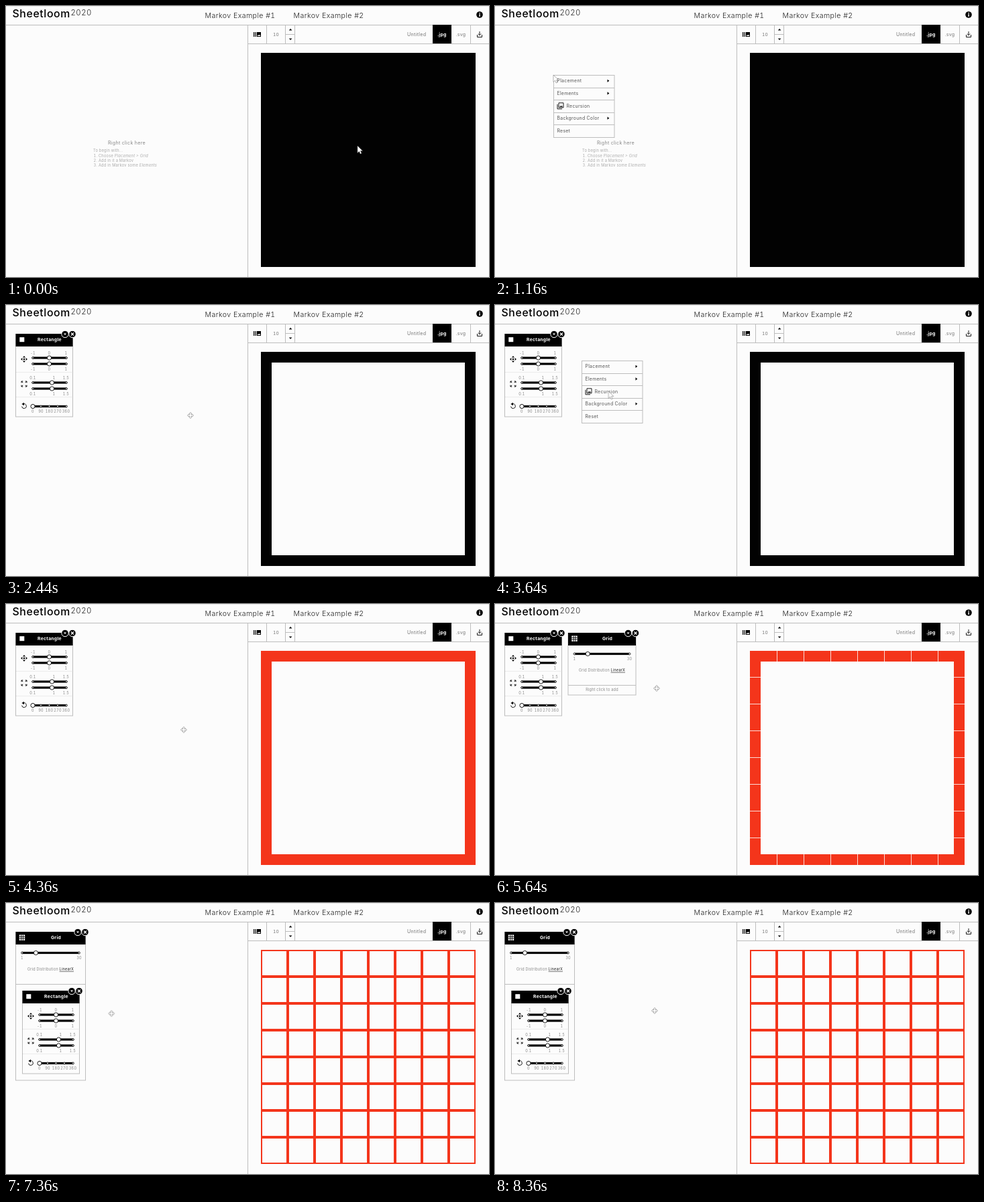
These frames come from a looping animation (720 px wide and 405 px high, 8440 ms). An HTML page:

```html
<!DOCTYPE html>
<html lang="en">
<head>
<meta charset="utf-8">
<title>Sheetloom</title>
<style>
  html, body { margin: 0; width: 100%; height: 100%; overflow: hidden; background: #fcfcfc; }
  svg { display: block; width: 100vw; height: 100vh; }
  text {
    font-family: Inter, Arial, sans-serif; font-variant-numeric: tabular-nums;
    letter-spacing: .04em; white-space: pre;
  }
  .line { fill: none; stroke: #bdbdbd; stroke-width: 1; }
  .faint { stroke: #dcdcdc; stroke-dasharray: 1 1; }
  .ink { fill: none; stroke: #000; stroke-width: .9; }
  .box { fill: #fcfcfc; stroke: #bdbdbd; }
  .mid { text-anchor: middle; }
  .light { font-weight: 300; }
  .medium { font-weight: 500; }
  .bold { font-weight: 700; fill: #fff; }
</style>
</head>
<body>
<svg id="stage" viewBox="0 0 720 405"></svg>
<script>
const LOOP = 8440;
const RED = '#f4351b';
const css = [];
const pct = ms => (ms / LOOP * 100).toFixed(3) + '%';

// --- drawing helpers ---
const text = (x, y, size, str, fill = '#555', cls = '') =>
  `<text x="${x}" y="${y}" font-size="${size}" fill="${fill}" class="${cls}">${str}</text>`;
const label = (x, y, str) => text(x, y, 5.5, str, '#888', 'mid');
const rect = (x, y, w, h, fill = '#000', extra = '') =>
  `<rect x="${x}" y="${y}" width="${w}" height="${h}" fill="${fill}" ${extra}/>`;
const box = (x, y, w, h) => `<rect class="box" x="${x}" y="${y}" width="${w}" height="${h}"/>`;
const path = (d, cls = 'line') => `<path class="${cls}" d="${d}"/>`;
const dot = (x, y, r, fill = '#fff') =>
  `<circle cx="${x}" cy="${y}" r="${r}" fill="${fill}" stroke="#000" stroke-width=".9"/>`;
const at = (x, y, body) => `<g transform="translate(${x} ${y})">${body}</g>`;

// Visible only during the given [from, to] spans, in ms.
let shown = 0;
function show(spans, body) {
  const name = 'show' + shown++;
  const keys = spans.map(([a, b]) =>
    `${pct(a)} { opacity: 1 } ` + (b < LOOP ? `${pct(b)} { opacity: 0 }` : '')).join(' ');
  css.push(`@keyframes ${name} { 0% { opacity: 0 } ${keys} }
    #${name} { opacity: 0; animation: ${name} ${LOOP}ms step-end infinite }`);
  return `<g id="${name}">${body}</g>`;
}

// --- icons ---
const moveIcon = '<path d="M0-5 2-2.6H-2ZM0 5 2 2.6H-2ZM-5 0-2.6-2V2ZM5 0 2.6-2V2Z"/>' +
  rect(-1.1, -1.1, 2.2, 2.2);
const growIcon = path('M-4-1.6V-4H-1.6M1.6-4H4V-1.6M4 1.6V4H1.6M-1.6 4H-4V1.6M-4-4-1.7-1.7M4-4 1.7-1.7M4 4 1.7 1.7M-4 4-1.7 1.7', 'ink');
const turnIcon = path('M-1-3A3.3 3.3 0 1 1-3.3 .6', 'ink') + '<path d="M-3.6-2.9 0-5.2V-.7Z"/>';
const gridIcon = rect(0, 0, 8.4, 8.4, '#fff') +
  path('M0 2.8H8.4M0 5.6H8.4M2.8 0V8.4M5.6 0V8.4', 'ink');
const recurIcon = path('M2.5.5H9.5V7.5H2.5ZM.5 2.5V9.5H7.5', 'ink') + '<path d="M3.8 6.4 5 4.8 6 5.7 7 4.4 8.4 6.4Z"/>';

function header(x, w, title) {
  const right = x + w;
  const button = (cx, mark) => `<circle cx="${cx}" cy="43.5" r="5.2" stroke="#fcfcfc"/>` + at(cx, 43.5, mark);
  return rect(x, 43, w, 19) +
    text(x + w / 2 + 8, 54.2, 6.8, title, '#fff', 'mid bold') +
    button(right - 11.5, '<path d="M-2-1H2L0 1.4Z" fill="#fff"/>') +
    button(right - .5, '<path d="M-2-2 2 2M2-2-2 2" stroke="#fff" stroke-width="1.2"/>');
}

function slider(x1, x2, y, knob, stops = []) {
  return rect(x1, y - 1.6, x2 - x1, 3.2) +
    [x1, x2, ...stops].map(x => dot(x, y, 1.4)).join('') + dot(knob, y, 3.1);
}

function rectBlock() {
  const row = (y, xs, names) => xs.map((x, i) => label(x, y, names[i])).join('');
  const shift = [40, 64.5, 89.5], scale = [40, 71.5, 89.5], turn = [40, 52, 64.5, 77, 89.5];
  const pair = (y, knob, xs, names) =>
    row(y - 5, xs, names) + slider(40, 90, y, knob) + slider(40, 90, y + 9, knob) + row(y + 19, xs, names);
  return box(14.5, 43.5, 85, 123.5) + header(14.5, 85, 'Rectangle') + rect(20.3, 48.2, 7, 7, '#fff') +
    at(27, 81, moveIcon) + pair(79, 64.5, shift, ['-1', '0', '1']) +
    path('M15 100.5H99M15 137.5H99', 'line faint') +
    at(27, 118, growIcon) + pair(116, 68.5, scale, ['0.1', '1', '1.5']) +
    at(27, 151, turnIcon) + slider(40, 90, 151.5, 40, [52, 64.5, 77]) +
    row(161, turn, [0, 90, 180, 270, 360]);
}

function gridBlock(x, w, h) {
  const a = x + 9.5, b = x + w - 9.5;
  return box(x, 43.5, w, h) + header(x, w, 'Grid') + at(x + 5.3, 47.5, gridIcon) +
    slider(a, b, 74.5, a + (b - a) * 7 / 29) + label(a, 84, 1) + label(b, 84, 30) +
    text(x + w / 2, 101.3, 5.5, 'Grid Distribution <tspan fill="#222" text-decoration="underline">LinearX</tspan>', '#888', 'mid') +
    path(`M${x} 121.5h${w}`);
}

// --- menus ---
const ROW = 18.6;
function list(x, y, w, names) {
  return box(x, y, w, ROW * names.length) + names.map((name, i) => {
    const top = y + i * ROW;
    const icon = name === 'Recursion';
    return (i ? path(`M${x} ${Math.floor(top) + .5}h${w}`) : '') +
      text(x + (icon ? 19 : 5), top + 10.8, 6.9, name) +
      (icon ? at(x + 5, top + 3.6, recurIcon) : '');
  }).join('');
}
function menu(x, y) {
  const arrow = i => at(x + 80, y + ROW * (i + .45), '<path d="M0-2.2V2.2L2.8 0Z"/>');
  return list(x, y, 90.5, ['Placement', 'Elements', 'Recursion', 'Background Color', 'Reset']) +
    [0, 1, 3].map(arrow).join('');
}
function swatches(x, y) {
  const colors = ['#000', '#fff', RED, '#f7a21b', '#f5e050', '#33a45a', '#2c62d6', '#8a3fb0'];
  return box(x, y, 51, 156) +
    colors.map((c, i) => rect(x + 3, y + 3 + i * 19, 45, 17, c, 'stroke="#a0a0a0" stroke-width=".5"')).join('');
}

// --- scene parts ---
const chrome =
  path('M0 .5H720', 'line faint') +
  path('M0 28.5H720M360.5 28V405M360 56.5H720M388.5 28V56M416.5 28V56M430.5 28V56M416 42.5H431M692.5 28V56') +
  text(9.5, 17.4, 15.8, 'Sheetloom', '#000', 'medium') +
  text(96.5, 14.3, 11.4, '2020', '#222', 'light') +
  text(296.5, 17.6, 10.6, 'Markov Example #1', '#222', 'light') +
  text(428.5, 17.6, 10.6, 'Markov Example #2', '#222', 'light') +
  '<circle cx="706" cy="13" r="4.8"/>' + rect(705.3, 12.2, 1.5, 3.6, '#fff') + rect(705.3, 10, 1.5, 1.4, '#fff') +
  rect(369, 39, 1.2, 7) + rect(371.4, 39, 1.2, 7) + rect(373.8, 39, 6.2, 7) +
  '<path d="M374.6 45 376 43 377 44 378 42.4 379.4 45Z" fill="#fff"/>' +
  text(402.5, 44.6, 6.6, '10', '#777', 'mid') +
  '<path d="M421.8 36.4h4.6l-2.3-2.6ZM421.8 48.4h4.6l-2.3 2.6Z"/>' +
  text(598, 44.6, 7.1, 'Untitled', '#777') + rect(636, 28, 28, 28) +
  text(650, 44.6, 6.9, '.jpg', '#fff', 'mid bold') + text(678, 44.6, 7, '.svg', '#777', 'mid') +
  path('M702.5 43V46.5H709.5V43M706 38V43.5M703.8 41.5 706 43.7 708.2 41.5', 'ink');

const hint =
  text(180, 206.6, 7.1, 'Right click here', '#888', 'mid') +
  text(130, 218.2, 5.7, 'To begin with...', '#aaa') +
  ['Choose <tspan font-style="italic">Placement &gt; Grid</tspan>', 'Add in it a Markov',
   'Add in Markov some <tspan font-style="italic">Elements</tspan>']
    .map((s, i) => text(130.5, 225.6 + i * 7.3, 5.7, `${i + 1}. ${s}`, '#aaa')).join('');

const sheet = fill => rect(380, 70, 320, 320, fill);
const steps = Array.from({ length: 8 }, (_, i) => i * 40);
const gridLines = `<path stroke="#fbdcd7" d="${
  steps.slice(1).map(d => `M${380 + d}.5 70V390M380 ${69 + d}.5H700`).join('')}"/>`;
const cells = steps.map(y => steps.map(x => rect(382 + x, 72 + y, 36, 36, '#fcfcfc')).join('')).join('');
const frame = rect(396, 86, 288, 288, '#fcfcfc');

const arrow = '<path d="M0 0V10.6L2.5 8.3 4.1 12 6 11.2 4.4 7.6H7.6Z" fill="#fff" stroke="#666" stroke-width=".5"/>';
const cross = '<path d="M0-4.6 1.8-2.6H1.1V-1.1H2.6V-1.8L4.6 0 2.6 1.8V1.1H1.1V2.6H1.8L0 4.6-1.8 2.6H-1.1V1.1H-2.6V1.8L-4.6 0-2.6-1.8V-1.1H-1.1V-2.6H-1.8Z" fill="#fff" stroke="#888" stroke-width=".7"/>';
const hand = '<path d="M-2 4-3.2 .8-2.2 0-1.6 .8V-3.4Q-1-4.4-.4-3.4V-1.2Q.8-2 1.2-.8 2.6-1.2 2.8.4V2.4L2 4Z" fill="#fff" stroke="#777" stroke-width=".7"/>';

// --- timing, in ms ---
const MENU1 = 1152, ADD_RECT = 2120, MENU2 = 3432, PICK_RED = 4352;
const MENU3 = 4800, ADD_GRID = 5480, GRAB = 6280, HOVER = 6520, DROP = 7072;

const route = [
  [0, 524, 209], [60, 524, 209], [880, 87, 103], [1160, 87, 103], [1460, 120, 131], [1800, 195, 131],
  [2080, 200, 131], [2440, 275, 165], [2880, 230, 140], [3120, 135, 89], [3280, 130, 84], [3440, 130, 84],
  [3760, 185, 147], [3960, 232, 147], [4240, 265, 188], [4360, 265, 188], [4740, 140, 86], [4840, 140, 86],
  [5040, 180, 95], [5320, 245, 95], [5460, 245, 96], [5640, 241, 126], [6200, 62, 51], [6320, 62, 51],
  [6760, 131, 132], [7080, 131, 132], [7500, 165, 175], [7960, 200, 178], [8360, 238, 161], [LOOP, 238, 161]
];
css.push(`@keyframes route { ${route.map(([t, x, y]) => `${pct(t)} { transform: translate(${x}px, ${y}px) }`).join(' ')} }
  #cursor { animation: route ${LOOP}ms ease-in-out infinite }`);

const scene = [
  chrome,
  show([[0, ADD_RECT]], hint),
  sheet('#020202'),
  show([[PICK_RED, LOOP]], sheet(RED)),
  show([[ADD_GRID, DROP]], gridLines),
  show([[ADD_RECT, DROP]], frame + rectBlock()),
  show([[ADD_GRID, DROP]], gridBlock(109, 101, 92.5)),
  show([[ADD_GRID, HOVER]], text(159.5, 130, 5.5, 'Right click to add', '#888', 'mid')),
  show([[HOVER, DROP]], text(159.5, 130, 5.5, 'The Box will replace the content', '#888', 'mid') +
    '<rect x="109.5" y="121.5" width="100" height="14.5" fill="none" stroke="#444" stroke-dasharray="1 1"/>'),
  show([[DROP, LOOP]], cells + gridBlock(14.5, 104, 221.5) + at(10, 88, rectBlock())),
  show([[MENU1, ADD_RECT]], menu(87.5, 103.5)),
  show([[1480, ADD_RECT]], list(178, 122, 90.5, ['Rectangle', 'Ellipse', 'Line', 'Text', 'Image'])),
  show([[MENU2, PICK_RED]], menu(129.5, 83.5)),
  show([[3760, PICK_RED]], swatches(220, 139)),
  show([[MENU3, ADD_GRID]], menu(140.5, 85.5)),
  show([[5000, ADD_GRID]], list(231, 85.5, 90.5, ['Grid', 'Markov'])),
  '<g id="cursor">' +
    show([[0, ADD_RECT], [MENU2, PICK_RED], [MENU3, ADD_GRID]], arrow) +
    show([[ADD_RECT, MENU2], [PICK_RED, MENU3], [ADD_GRID, GRAB], [DROP, LOOP]], cross) +
    show([[GRAB, DROP]], hand) + '</g>'
];

const style = document.createElement('style');
style.textContent = css.join('\n');
document.head.append(style);
document.getElementById('stage').innerHTML = scene.join('');
</script>
</body>
</html>
```
